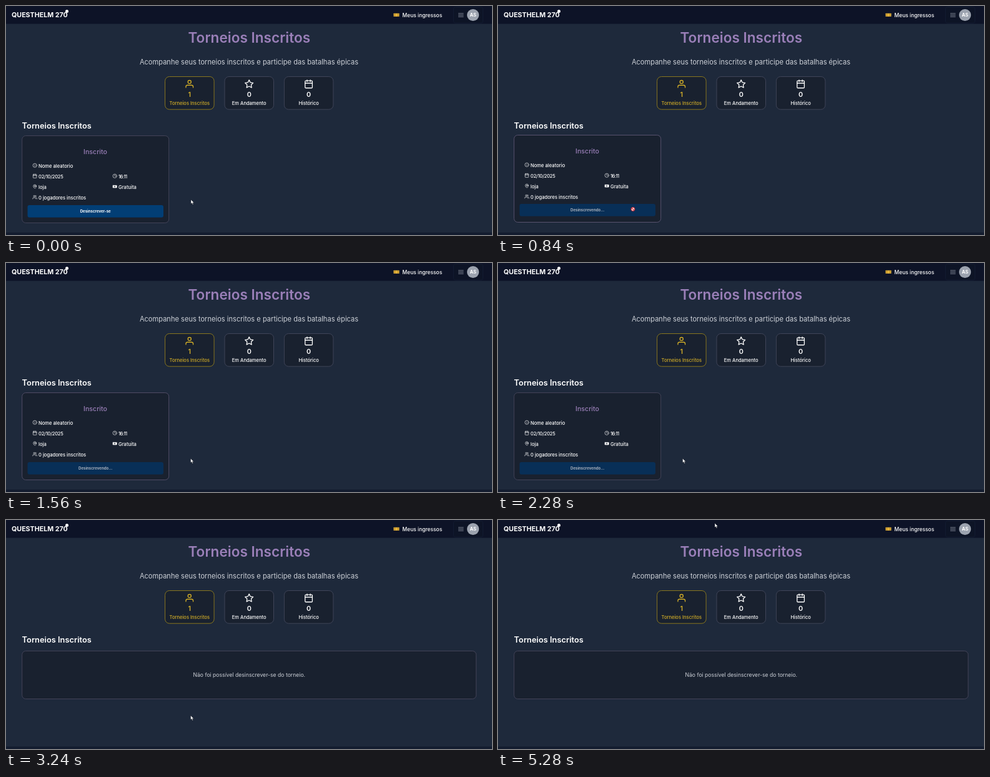
Recreate the animation shown at these times as an HTML page. Size 778 by 368 pixels, loop 5.4 s.

```html
<!DOCTYPE html>
<html lang="pt-BR">
<head>
<meta charset="utf-8">
<title>Torneios Inscritos</title>
<style>
  html, body { margin: 0; width: 100%; height: 100%; overflow: hidden; background: #1e293b; }
  svg { display: block; width: 100%; height: 100%; }
  text { font-family: Inter, sans-serif; fill: #fff; }
  .mid { text-anchor: middle; }
  .icon { fill: none; stroke: currentColor; stroke-width: 2; stroke-linecap: round; stroke-linejoin: round; }
  .panel { fill: #19212f; stroke: #434358; }
  #rows text { font-size: 7.6px; font-weight: 500; }
</style>
</head>
<body>
<svg viewBox="0 0 778 368">
  <defs>
    <g id="user"><circle cx="12" cy="7" r="4"/><path d="M3 21v-2a4 4 0 0 1 4-4h10a4 4 0 0 1 4 4v2"/></g>
    <path id="star" d="M12 2l3.1 6.3 6.9 1-5 4.9 1.2 6.8-6.2-3.2L5.8 21 7 14.2 2 9.3l6.9-1z"/>
    <g id="calendar"><rect x="3" y="4" width="18" height="18" rx="2"/><path d="M8 2v4M16 2v4M3 10h18"/></g>
    <g id="info"><circle cx="12" cy="12" r="10"/><path d="M12 16v-4M12 8v.1"/></g>
    <g id="clock"><circle cx="12" cy="12" r="10"/><path d="M12 6v6l4 2"/></g>
    <g id="pin"><path d="M20 10c0 6-8 12-8 12s-8-6-8-12a8 8 0 0 1 16 0z"/><circle cx="12" cy="10" r="3"/></g>
    <g id="users"><circle cx="9" cy="7" r="4"/><path d="M1 21v-2a4 4 0 0 1 4-4h8a4 4 0 0 1 4 4v2M23 21v-2a4 4 0 0 0-3-3.9M16 3.1a4 4 0 0 1 0 7.8"/></g>
    <g id="cash"><rect x="2" y="6" width="20" height="12" rx="1" fill="currentColor"/><circle cx="12" cy="12" r="3" fill="#19212f" stroke="none"/></g>
  </defs>

  <rect width="778" height="368" fill="#1e293b"/>
  <rect y="364" width="778" height="4" fill="#131c2f"/>

  <rect width="778" height="28.7" fill="#0d1327"/>
  <text x="9" y="18" font-size="10.7" font-weight="700">QUESTHELM 270</text>
  <circle cx="97.5" cy="8.5" r="2.5" fill="#fff"/>
  <rect x="620.5" y="11.7" width="9" height="5.3" rx=".6" fill="#e0b13a"/>
  <path d="M622.5 12v5M627.5 12v5" stroke="#a8741f" stroke-width=".7"/>
  <text x="634.5" y="17.5" font-size="8.45" font-weight="500">Meus ingressos</text>
  <rect x="716.5" y="1.5" width="47" height="26" rx="3" fill="#0d1426" stroke="#121b31"/>
  <path d="M724 12h8.5M724 14.6h8.5M724 17.2h8.5" stroke="#a3a9b5" stroke-width=".8"/>
  <circle cx="747.6" cy="14.5" r="9.6" fill="#9ca3af"/>
  <text class="mid" x="747.6" y="17.3" font-size="7.5" font-weight="700">AS</text>

  <text class="mid" x="389.3" y="59.3" font-size="22.6" font-weight="600" style="fill:#9a7fb8">Torneios Inscritos</text>
  <text class="mid" x="389" y="93.7" font-size="11.1" style="fill:#cdd1d8">Acompanhe seus torneios inscritos e participe das batalhas épicas</text>
  <g id="tabs"></g>
  <text x="25.6" y="196.6" font-size="12.85" font-weight="600">Torneios Inscritos</text>

  <g id="card">
    <rect id="cardBox" class="panel" x="25.7" y="208.5" width="235" height="140" rx="6"/>
    <text class="mid" x="143" y="238.2" font-size="10.6" font-weight="500" style="fill:#9a7fb8">Inscrito</text>
    <g id="rows"></g>
    <g id="button">
      <rect id="buttonBox" x="34.5" y="320" width="217.5" height="19.8" rx="3"/>
      <text id="buttonLabel" class="mid" x="143.2" y="332.4" font-size="6.1" font-weight="700"></text>
    </g>
  </g>

  <g id="error">
    <rect class="panel" x="25.7" y="210.5" width="727" height="77" rx="6"/>
    <text class="mid" x="389.3" y="252.3" font-size="8.65" style="fill:#cdd1d8">Não foi possível desinscrever-se do torneio.</text>
  </g>

  <path id="arrow" d="M0 0v7l1.6-1.4 1.2 2.6 1.2-.6-1.2-2.4h2.2z" fill="#fff" stroke="#0b0f18" stroke-width=".5"/>
  <g id="blocked">
    <circle r="2.8" fill="#fff" stroke="#c8323c" stroke-width="1.2"/>
    <path d="M-2-2l4 4" stroke="#c8323c" stroke-width="1.2"/>
  </g>
</svg>
<script>
const $ = id => document.getElementById(id);
const LOOP = 5400, STEP = 120;
const CLICK = 840, LEAVE = 1440, FAIL = 2760;

const icon = (name, cx, cy, size, color = '#fff') =>
  `<use href="#${name}" class="icon" color="${color}" transform="translate(${cx - size / 2} ${cy - size / 2}) scale(${size / 24})"/>`;

const tab = (x, name, count, label, color, border) => {
  const cx = x + 39.2;
  return `<rect x="${x}" y="113.5" width="78.5" height="52.7" rx="7" fill="#19212f" stroke="${border}"/>
    ${icon(name, cx, 125.3, 15.5, color)}
    <text class="mid" x="${cx}" y="146.3" font-size="10.8" font-weight="600" style="fill:${color}">${count}</text>
    <text class="mid" x="${cx}" y="158.9" font-size="7.55" font-weight="500" style="fill:${color}">${label}</text>`;
};
$('tabs').innerHTML =
  tab(254.6, 'user', 1, 'Torneios Inscritos', '#d0ac28', '#88761f') +
  tab(350, 'star', 0, 'Em Andamento', '#fff', '#3f4458') +
  tab(445.4, 'calendar', 0, 'Histórico', '#fff', '#3f4458');

const row = (x, y, name, label, spacing = 0) =>
  icon(name, x, y - 0.8, 7.5) +
  `<text x="${x + 5.8}" y="${y + 2.8}" letter-spacing="${spacing}">${label}</text>`;
$('rows').innerHTML =
  row(46.2, 257, 'info', 'Nome aleatorio') +
  row(46.2, 274, 'calendar', '02/10/2025', -0.25) +
  row(174.2, 274, 'clock', '16:11', -0.6) +
  row(46.2, 291, 'pin', 'loja') +
  row(174.2, 291, 'cash', 'Gratuita') +
  row(46.2, 308, 'users', '0 jogadores inscritos');

// Pointer path: time, x, y
const path = [
  [0, 296, 311], [360, 226, 326], [480, 216, 325], [1320, 216, 325],
  [1440, 280, 317], [1560, 295.5, 314], [4440, 295.5, 314],
  [4560, 296, 300], [4680, 296, 300], [5280, 347, 5], [LOOP, 347, 5]
];
const ramp = (t, from, to) => Math.min(1, Math.max(0, (t - from) / (to - from)));
const mix = (a, b, k) => a + (b - a) * k;
const place = (id, x, y) => $(id).setAttribute('transform', `translate(${x} ${y})`);
const show = (id, visible) => { $(id).style.display = visible ? '' : 'none'; };

function pointerAt(t) {
  const i = path.findIndex(key => key[0] > t);
  const [t0, x0, y0] = path[i - 1], [t1, x1, y1] = path[i];
  const k = ramp(t, t0, t1);
  return [mix(x0, x1, k), mix(y0, y1, k)];
}

function draw(time) {
  const t = Math.floor(time % LOOP / STEP) * STEP;
  const failed = t >= FAIL, waiting = t >= CLICK;
  const blocked = waiting && t < LEAVE;
  const lift = ramp(t, 120, 480) - ramp(t, 1320, 1560);
  const glow = ramp(t, 120, 480) - ramp(t, 1320, 1920);

  show('card', !failed);
  show('error', failed);
  place('card', 0, -lift);
  place('button', 0, -lift);
  $('cardBox').style.stroke = `rgb(${mix(67, 88, glow)},${mix(67, 82, glow)},${mix(88, 110, glow)})`;
  $('buttonBox').style.fill = waiting ? '#082f57' : '#023e75';
  $('buttonLabel').textContent = waiting ? 'Desinscrevendo...' : 'Desinscrever-se';
  $('buttonLabel').style.fill = waiting ? '#a9b0bb' : '#fff';

  const [x, y] = pointerAt(t);
  show('arrow', !blocked);
  show('blocked', blocked);
  place('arrow', x, y);
  place('blocked', x, y + 1.5);
}

function tick() {
  draw(performance.now());
  requestAnimationFrame(tick);
}
tick();
</script>
</body>
</html>
```
